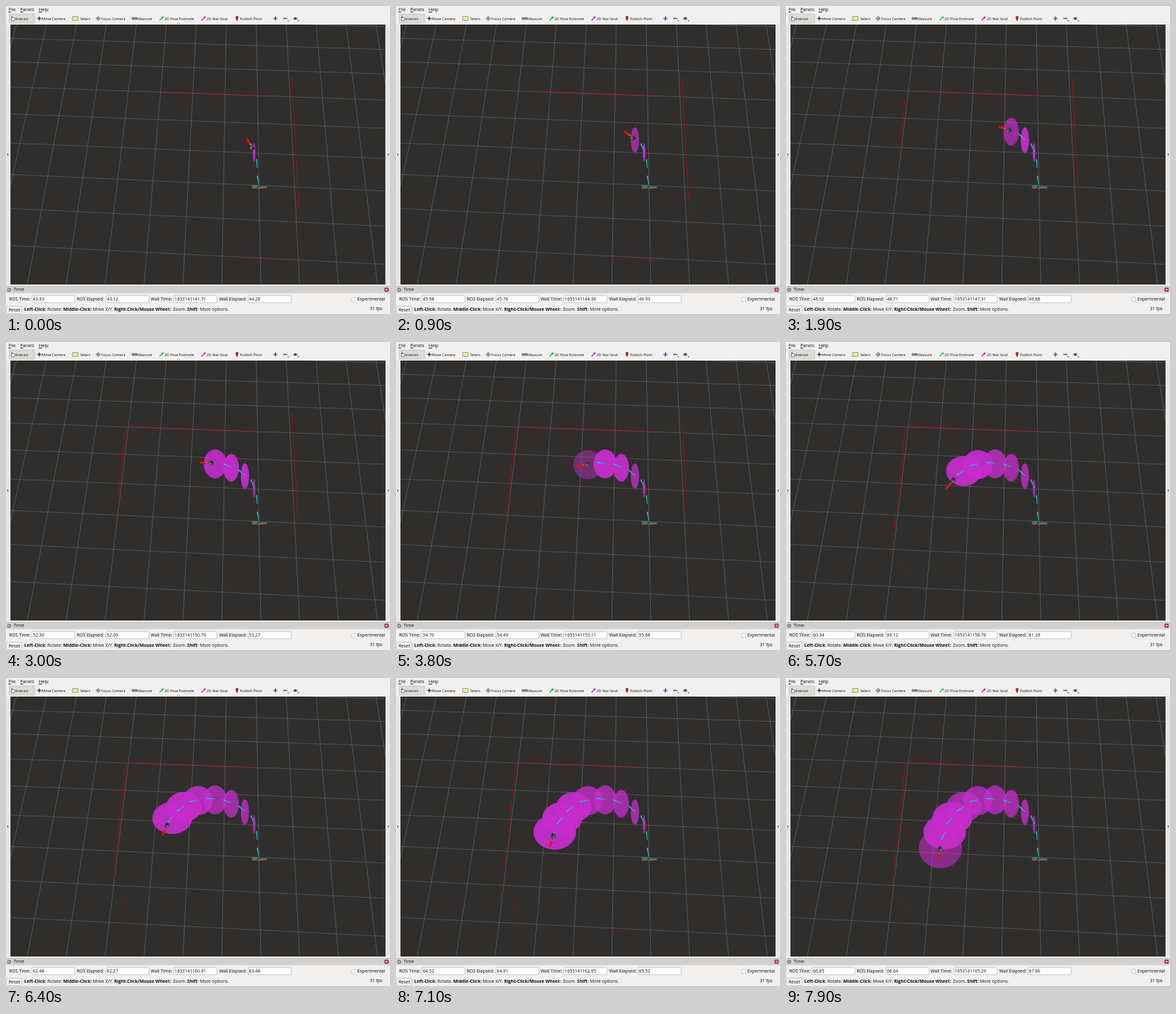
An HTML page with a canvas for the animation above (8000 ms loop, 600 px wide and 481 px high).

```html
<!DOCTYPE html>
<html lang="en">
<head>
<meta charset="utf-8">
<title>Robot view</title>
<style>
html, body { margin: 0; width: 100%; height: 100%; overflow: hidden; background: #f1f0ef; }
#stage { position: relative; width: 600px; height: 481px; overflow: hidden; }
canvas { position: absolute; left: 0; top: 0; }
span { position: absolute; white-space: pre; line-height: 10px; color: #0c0c0c;
  font-family: "Open Sans", "Noto Sans", sans-serif; }
</style>
</head>
<body>
<div id="stage"><canvas id="view" width="600" height="481"></canvas></div>
<script>
const LOOP = 8000, STEP = 100;
const stage = document.getElementById('stage');
const g = document.getElementById('view').getContext('2d');

// control points of the drive, one every LEG ms; the third is passed at time 0
const LEG = 1975;
const DRIVE = [[396, 320], [394, 271], [385, 222], [347, 193.5], [296, 191.5], [258, 220], [241, 267], [241, 318]];

// clock readings at a few times, since the recording speed wavers
const TICKS = [0, 1900, 3000, 3800, 4900, 6400, 7900];
const ROS = [43.33, 48.92, 52.30, 54.70, 57.89, 62.48, 66.85];

const clamp = (v, a = 0, b = 1) => Math.max(a, Math.min(b, v));

function drive(t) {
  const s = t / LEG + 2;
  const i = clamp(Math.floor(s), 1, DRIVE.length - 3), u = s - i;
  const [x, y] = [0, 1].map(k => {
    const [a, b, c, d] = DRIVE.slice(i - 1, i + 3).map(p => p[k]);
    return b + u / 2 * (c - a + u * (2 * a - 5 * b + 4 * c - d + u * (3 * (b - c) + d - a)));
  });
  return { x, y };
}

function pose(t) {
  const p = drive(t), a = drive(t - 20), b = drive(t + 20);
  return { ...p, angle: Math.atan2(b.y - a.y, b.x - a.x) };
}

function rosTime(t) {
  let i = 0;
  while (i < TICKS.length - 2 && t >= TICKS[i + 1]) i++;
  return ROS[i] + (ROS[i + 1] - ROS[i]) * (t - TICKS[i]) / (TICKS[i + 1] - TICKS[i]);
}

function noise(a, b) {
  const s = Math.sin(a * 12.9898 + b * 78.233) * 43758.5453;
  return s - Math.floor(s);
}

function label(x, y, size, html, color) {
  const el = document.createElement('span');
  el.style.cssText = `left:${x}px;top:${y - 5}px;font-size:${size}px`;
  if (color) el.style.color = color;
  el.innerHTML = html;
  stage.appendChild(el);
  return el;
}

function box(x, y, w, h, fill, stroke, r = 1.5) {
  g.beginPath();
  g.roundRect(x, y, w, h, r);
  g.fillStyle = fill;
  g.fill();
  if (stroke) { g.strokeStyle = stroke; g.lineWidth = .7; g.stroke(); }
}

function line(x1, y1, x2, y2, color, w) {
  g.strokeStyle = color;
  g.lineWidth = w;
  g.beginPath();
  g.moveTo(x1, y1);
  g.lineTo(x2, y2);
  g.stroke();
}

function poly(color, ...p) {
  g.fillStyle = color;
  g.beginPath();
  for (let i = 0; i < p.length; i += 2) g.lineTo(p[i], p[i + 1]);
  g.fill();
}

function disc(x, y, rx, ry, color) {
  g.fillStyle = color;
  g.beginPath();
  g.ellipse(x, y, rx, ry, 0, 0, 7);
  g.fill();
}

function ring(x, y, r, color, w) {
  g.strokeStyle = color;
  g.lineWidth = w;
  g.beginPath();
  g.arc(x, y, r, 0, 7);
  g.stroke();
}

function cross(x, y, r, color, w) {
  line(x - r, y, x + r, y, color, w);
  line(x, y - r, x, y + r, color, w);
}

function goalIcon(x, color) {
  line(x - 3, 22.5, x + 2.5, 17, color, 1.6);
  poly(color, x + 3.5, 16, x + 2.5, 19.8, x - .2, 17);
}

function icons() {
  box(5, 12.5, 40, 14.5, '#dddbd9', '#bcb9b6');
  box(8.5, 18.5, 5, 4.5, '#fff', '#333', 1);
  line(9.3, 19, 9.3, 15.5, '#333', 1.1);
  cross(52, 19.5, 3.8, '#5d6f80', 1.2);
  disc(52, 19.5, 2, 2, '#444');
  box(104, 16.5, 8.5, 6, '#f3eaa8', '#777050', 0);
  ring(144, 19.5, 2.4, '#555', .8);
  cross(144, 19.5, 4, '#555', .7);
  box(197, 18, 7.5, 3, '#8b8b88', '#555', 0);
  goalIcon(243, '#19c837');
  goalIcon(308.5, '#c81ec8');
  poly('#7e2a20', 358.8, 19, 363.2, 19, 361, 23.8);
  disc(361, 18, 2.4, 2.4, '#a83428');
  cross(421, 19.5, 3.2, '#4472ae', 2);
  line(433, 19.5, 439.5, 19.5, '#4472ae', 2);
  disc(452, 19.5, 3.6, 2.3, '#8fa3b8');
  disc(452, 19.5, 1.5, 1.5, '#27313c');
  for (const x of [441, 457]) poly('#333', x - 1.4, 22.5, x + 1.4, 22.5, x, 24.2);
}

function chrome() {
  g.fillStyle = '#f1f0ef';
  g.fillRect(0, 0, 600, 481);
  icons();
  g.fillStyle = '#e6e5e3';
  g.fillRect(0, 29, 600, 406);
  poly('#333', 2, 230.3, 2, 233.7, 4, 232);
  poly('#333', 598, 230.3, 598, 233.7, 596, 232);
  g.fillStyle = '#d2d0ce';
  g.fillRect(0, 437.5, 600, 11);
  line(0, 437.5, 600, 437.5, '#b9b6b3', .8);
  ring(5, 443.2, 2.5, '#444', .9);
  line(5, 443.2, 5, 441.6, '#444', .7);
  line(5, 443.2, 6.3, 443.2, '#444', .7);
  box(591.8, 440.2, 5.6, 5.6, '#c02a2e', '#7f1c1f', 1);
  ring(594.6, 443, 1.2, '#fff', .8);
  for (const x of [40, 156, 262, 378]) box(x + .4, 452.3, 67.2, 11, '#fff', '#b4b0ac');
  box(540, 455, 6.2, 6.2, '#fff', '#b4b0ac', 1);
  box(.8, 468.8, 24.4, 11.4, '#f4f3f2', '#b4b0ac');
}

// the floor grid in perspective, counted from the lines through the start point
function grid() {
  const color = 'rgba(150,150,150,.5)';
  const row = (y, step, shrink, n) => (y + step * n) / (1 - shrink * n);
  for (let n = -6; n < 4; n++) {
    line(7, row(263, 40.5, .0401, n), 592.5, row(289, 41.6, .0387, n), color, .8);
  }
  for (let n = -9; n < 6; n++) line(391 + 46.8 * n, 28, 398 + 60.8 * n, 435, color, .8);
}

// a run of scan returns between two points, thinned by keep and slightly scattered
function scan(x1, y1, x2, y2, gap, keep, seed, tick) {
  const len = Math.hypot(x2 - x1, y2 - y1);
  const dx = (x2 - x1) / len, dy = (y2 - y1) / len;
  for (let d = 0, i = 0; d <= len; d += gap, i++) {
    if (noise(i + seed, tick) > keep) continue;
    const off = (noise(i, seed + tick * .37) - .5) * 1.1;
    g.fillStyle = `rgba(${150 + 40 * noise(i, seed)},14,24,.8)`;
    g.fillRect(x1 + dx * d - dy * off - .6, y1 + dy * d + dx * off - .6, 1.3, 1.3);
  }
}

// a side wall: solid near the top, loose towards its far end
function sideWall(xAt, lo, hi, keep, seed, tick) {
  if (hi <= lo) return;
  const mid = lo + (hi - lo) * .75;
  scan(xAt(lo), lo, xAt(mid), mid, 1.2, keep, seed, tick);
  scan(xAt(mid), mid, xAt(hi), hi, 4, .8, seed + 6, tick);
}

function dot(x, y) {
  g.fillStyle = 'rgba(160,16,26,.75)';
  g.fillRect(x - .8, y - .7, 1.8, 1.4);
}

function walls(t) {
  const tick = t / STEP, s = t / 1000;
  const topY = x => 131.3 + (x - 188) * .0385;
  const rightX = y => 446.8 + (y - 113) * .0545;
  const leftX = y => 187.6 - (y - 132) * .117;

  const a = Math.max(188, 240 - 17.4 * s), b = 400 - 35 * (t / 7900) ** 3;
  line(a + 12, topY(a + 12), b - 8, topY(b - 8), 'rgba(150,22,30,.55)', .8);
  scan(a, topY(a), b, topY(b), 1.5, .8, 11, tick);

  if (t < 5400) {
    const lo = 112 + 38 * clamp((s - 3) / 1.9), hi = 385 - 150 * (s / 4.9) ** 1.3;
    sideWall(rightX, lo, hi, s > 4.3 ? .4 : .9, 23, tick);
  }
  sideWall(leftX, Math.max(132, 165 - 11 * s), 362 - 330 * Math.exp(-s / 2), .9, 41, tick);

  const reach = Math.max(128 - 67 * s, 33 * (s - 6.1));
  if (reach > 0) scan(335, 393.3, 335 + reach, 393.3 + reach * .037, 2.2, .8, 53, tick);
  if (s >= 4.5) {
    scan(174, 349, 184, 350, 2, .8, 61, tick);
    scan(184, 350, 190.5, 361, 2, .8, 67, tick);
  }
  if (s >= 5.9) scan(180, 386, 195, 387.5, 2, .8, 71, tick);

  dot(301.5, 221.8);
  if (s < 4.2) dot(342, 224);
  if (s < .7 || s >= 4.5) dot(298.5, 292);
  if (s < .7 || (s >= 2.5 && s < 5)) dot(340, 293);
}

// past poses: an uncertainty ellipse that grows with every step, and a heading
function trail(t) {
  const marks = [];
  for (let k = -2; k < 9; k++) {
    const born = 1010 * k - 260;
    if (born <= t) marks.push({ k, age: t - born, ...pose(born) });
  }
  for (const { k, age, x, y } of marks) {
    if (k < 0) continue;
    const rx = 2 + 32 * Math.sin(k * Math.PI / 16) ** 1.2;
    const ry = 23 - 8.5 * Math.exp(-k) + .5 * Math.max(0, k - 4) ** 2;
    const alpha = Math.min(.95, .4 + age * .0022) - clamp((age - 2300) / 4000, 0, .18);
    disc(x, y + 1, rx, ry, `rgba(198,45,204,${alpha})`);
  }
  for (const { x, y, angle } of marks) {
    const dx = 13.5 * Math.cos(angle), dy = 13.5 * Math.sin(angle);
    line(x, y, x + dx * .6, y + dy * .6, '#22bcd4', 1.1);
    line(x + dx * .55, y + dy * .55, x + dx, y + dy, '#22bcd4', 1.8);
  }
}

function robot(t) {
  const p = pose(t);
  g.save();
  g.translate(p.x, p.y);
  g.rotate(p.angle);
  line(4, 0, 10, 0, '#c01616', 1.8);
  poly('#d81414', 8.5, -2, 17, -1.5, 18.5, 0, 17, 1.5, 8.5, 2);
  disc(0, 0, 4.4, 4, 'rgba(70,68,72,.95)');
  disc(-1.5, 1.4, 2, 1.6, '#2a292b');
  disc(1.8, -1.4, 1.6, 1.5, '#777479');
  g.fillStyle = '#c9c4cc';
  g.fillRect(6.3, -.6, 1.4, 1.2);
  g.restore();
}

function scene(t) {
  g.save();
  g.beginPath();
  g.rect(7, 29, 585.5, 406);
  g.clip();
  g.fillStyle = '#2f2e2d';
  g.fillRect(7, 28, 586, 408);
  grid();
  walls(t);
  line(384, 280.6, 394.5, 280.6, '#1fc52c', 1.3);
  trail(t);
  robot(t);
  g.restore();
}

[[4, '<u>F</u>ile'], [22.5, '<u>P</u>anels'], [51, '<u>H</u>elp']]
  .forEach(([x, s]) => label(x, 5.3, 7.1, s));
[[14.5, 'Interact'], [56, 'Move Camera'], [116, 'Select'], [149, 'Focus Camera'], [205, 'Measure'],
  [247.5, '2D Pose Estimate'], [313.5, '2D Nav Goal'], [365.5, 'Publish Point']]
  .forEach(([x, s]) => label(x, 19.5, 5.7, s));
label(12, 443, 7, 'Time');
[[5, 'ROS Time:'], [110.5, 'ROS Elapsed:'], [226, 'Wall Time:'], [333, 'Wall Elapsed:'], [549, 'Experimental']]
  .forEach(([x, s]) => label(x, 457.8, 7, s));
label(4, 474.5, 7, 'Reset');
label(28.5, 474.3, 6.95, '<b>Left-Click:</b> Rotate. <b>Middle-Click:</b> Move X/Y. '
  + '<b>Right-Click/Mouse Wheel:</b>: Zoom. <b>Shift</b>: More options.');
label(384, 282.6, 4.6, 'sam_odom', '#e4e4e4');
label(568.5, 473, 7, '31 fps');
const fields = [42, 157.5, 263.5, 379.5].map(x => label(x, 457.8, 6.9, ''));

chrome();

function frame() {
  const t = Math.floor(performance.now() % LOOP / STEP) * STEP;
  scene(t);
  const ros = rosTime(t), wall = ros + 98.38 + .0000075 * t;
  [ros, ros - .214, 1653141100 + wall - 100, wall - 97.43]
    .forEach((v, i) => { fields[i].textContent = v.toFixed(2); });
  requestAnimationFrame(frame);
}
frame();
</script>
</body>
</html>
```
